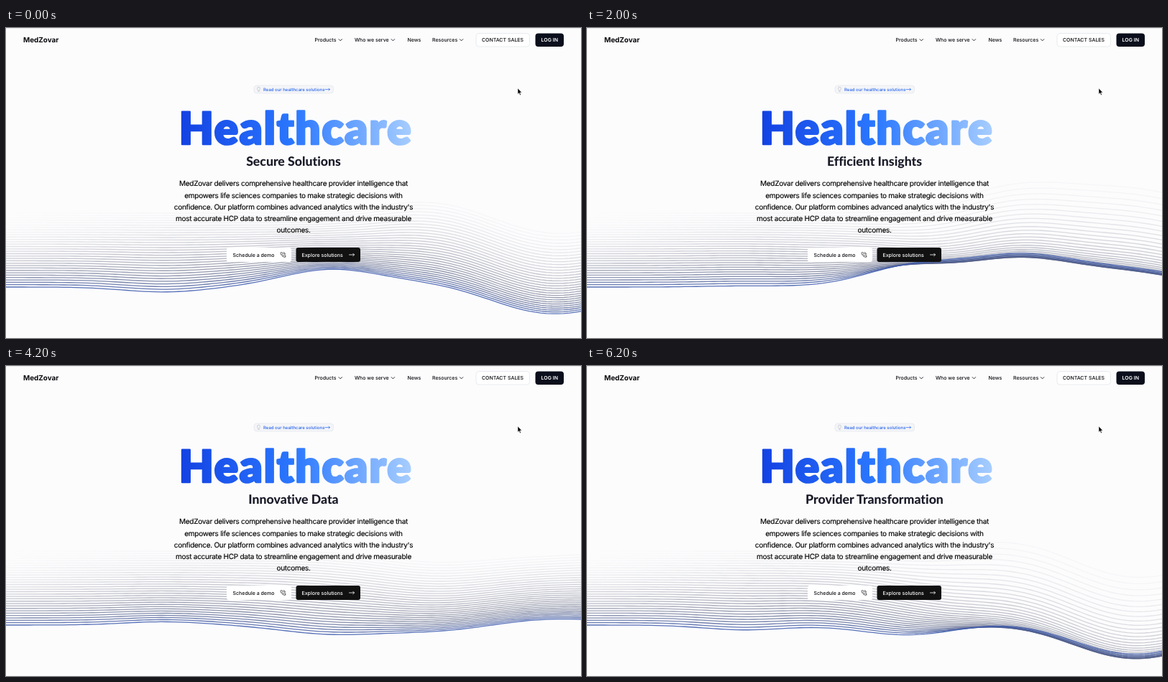
These frames come from a looping animation (800 by 432 pixels, 6300 ms). An HTML page with a canvas:

```html
<!DOCTYPE html>
<html lang="en">
<head>
<meta charset="utf-8">
<title>Healthcare</title>
<style>
  html, body { margin: 0; width: 100%; height: 100%; overflow: hidden; background: #fcfcfd; }
  canvas, svg { position: absolute; left: 0; top: 0; width: 800px; height: 432px; }
  text { font: 500 7px Inter, sans-serif; fill: #0b0b0f; text-rendering: geometricPrecision; }
  .brand { font-weight: 700; font-size: 9.9px; }
  .login { font-weight: 600; fill: #fff; }
  .badge { font-size: 6px; fill: #2563eb; }
  .hero { font: 900 62px Lato, sans-serif; letter-spacing: 1.8px; fill: url(#blues);
    stroke: url(#blues); stroke-width: 2.6; stroke-linejoin: round; }
  .titles text { font: 800 17.7px Lato, sans-serif; font-variant-ligatures: none; fill: #1a1b28; }
  .copy text { font-weight: 400; font-size: 10px; letter-spacing: -.26px; fill: #000; stroke: #000; stroke-width: .15; }
  .mid { text-anchor: middle; }
  .icon { fill: none; stroke: #18181b; stroke-linecap: round; stroke-linejoin: round; }
</style>
</head>
<body>
<canvas id="waves" width="800" height="432"></canvas>
<svg viewBox="0 0 800 432">
  <defs>
    <linearGradient id="blues" gradientUnits="userSpaceOnUse" x1="241" x2="563" y1="0" y2="0">
      <stop stop-color="#1341e2"/>
      <stop offset=".5" stop-color="#2b78ff"/>
      <stop offset="1" stop-color="#a6cdff"/>
    </linearGradient>
  </defs>

  <rect width="800" height="1" fill="#ececee"/>
  <text class="brand" x="24" y="20">MedZovar</text>
  <text x="429.5" y="19">Products</text>
  <text x="485" y="19">Who we serve</text>
  <text x="558.5" y="19">News</text>
  <text x="593" y="19">Resources</text>
  <path class="icon" stroke-width=".9" d="M463 15.6l2.2 2.2 2.2-2.2M536.2 15.6l2.2 2.2 2.2-2.2M631.4 15.6l2.2 2.2 2.2-2.2"/>
  <rect x="654" y="7.5" width="74.5" height="18.5" rx="4" fill="#fff" stroke="#e4e6ea" stroke-width=".8"/>
  <text class="mid" x="691" y="19">CONTACT SALES</text>
  <rect x="736.5" y="7.5" width="39.5" height="18.5" rx="4" fill="#0b0f1c"/>
  <text class="login mid" x="756.3" y="19">LOG IN</text>

  <rect x="345" y="80" width="110.5" height="11" rx="4" fill="#f4f5f8" stroke="#e2e5ea" stroke-width=".7"/>
  <path class="icon" style="stroke:#b5b8c0" stroke-width=".6" d="M350.8 87.2c0-1-1.3-1.5-1.3-2.9a2 2 0 0 1 4 0c0 1.4-1.3 1.9-1.3 2.9zM350.9 88.6h1.2"/>
  <text class="badge" x="358" y="87.8">Read our healthcare solutions</text>
  <path class="icon" style="stroke:#2563eb" stroke-width=".7" d="M444 85.6h6.5m-1.5-1.5l1.5 1.5-1.5 1.5"/>

  <text class="hero mid" x="403" y="162.3">Healthcare</text>
  <g class="titles mid" id="titles"></g>
  <g class="copy mid" id="copy"></g>

  <rect x="307" y="306" width="90" height="20" rx="3" fill="#fff"/>
  <text x="315.5" y="318.6">Schedule a demo</text>
  <path class="icon" stroke-width="2" transform="translate(381.3 312) scale(.34)" d="M22 16.92v3a2 2 0 0 1-2.18 2 19.79 19.79 0 0 1-8.63-3.07 19.5 19.5 0 0 1-6-6 19.79 19.79 0 0 1-3.07-8.67A2 2 0 0 1 4.11 2h3a2 2 0 0 1 2 1.72 12.84 12.84 0 0 0 .7 2.81 2 2 0 0 1-.45 2.11L8.09 9.91a16 16 0 0 0 6 6l1.27-1.27a2 2 0 0 1 2.11-.45 12.84 12.84 0 0 0 2.81.7A2 2 0 0 1 22 16.92zM14.05 2a9 9 0 0 1 8 7.94M14.05 6A5 5 0 0 1 18 10"/>
  <rect x="403.5" y="306" width="89.5" height="20" rx="3" fill="#111"/>
  <text x="411.5" y="318.6" style="fill:#fff">Explore solutions</text>
  <path class="icon" style="stroke:#fff" stroke-width=".8" d="M477.5 316h7m-1.7-1.7l1.7 1.7-1.7 1.7"/>

  <path d="M712 84v8.2l1.8-1.7 1.3 3 1.3-.6-1.3-2.9h2.5z" fill="#000" stroke="#fff" stroke-width=".5"/>
</svg>
<script>
const LOOP = 6300, STEP = 100, LINES = 32;
const ctx = document.getElementById('waves').getContext('2d');

function addText(parent, content, y) {
  const el = document.createElementNS('http://www.w3.org/2000/svg', 'text');
  el.setAttribute('x', 400);
  el.setAttribute('y', y);
  el.textContent = content;
  document.getElementById(parent).append(el);
  return el;
}

const titles = ['Secure Solutions', 'Efficient Insights', 'Innovative Data', 'Provider Transformation']
  .map(title => addText('titles', title, 192.3));
['MedZovar delivers comprehensive healthcare provider intelligence that',
 'empowers life sciences companies to make strategic decisions with',
 'confidence. Our platform combines advanced analytics with the industry\'s',
 'most accurate HCP data to streamline engagement and drive measurable',
 'outcomes.'].forEach((line, i) => addText('copy', line, 220.4 + i * 16.25));

// Bell-shaped swells, each bobbing around its mean; depth confines one to the lower lines.
const swells = [
  { x: 220, width: 80, mean: 0, height: 7, speed: 1, peak: .2, depth: 2 },
  { x: 450, width: 95, mean: -6, height: 26, speed: .75, peak: 5.3, depth: 2 },
  { x: 600, width: 110, mean: -13, height: 29, speed: 1, peak: 4.9, depth: 0 },
  { x: 760, width: 120, mean: 3, height: 38, speed: .95, peak: 6.2, depth: 0 },
];

// s runs from 0 at the top line to 1 at the bottom one, t is in seconds.
function waveY(x, s, t) {
  const sag = (25 + 18 * Math.cos(1.57 * (t - 2.2))) / (1 + Math.exp((470 - x) / 50));
  let y = 258 + 103 * s + sag * 4 * s * (1 - s);
  for (const { x: centre, width, mean, height, speed, peak, depth } of swells) {
    const bob = mean + height * Math.cos(speed * (t + .4 * (1 - s) - peak));
    y += s ** depth * Math.exp(-(((x - centre) / width) ** 2)) * bob;
  }
  return y;
}

function lineColour(s) {
  const blue = s ** 7, alpha = .04 + .82 * s ** 1.35;
  const rgb = `${92 - 32 * blue},${96 - 6 * blue},${118 + 54 * blue}`;
  const fade = ctx.createLinearGradient(0, 0, 250, 0);
  fade.addColorStop(0, `rgba(${rgb},${alpha * s})`);
  fade.addColorStop(1, `rgba(${rgb},${alpha})`);
  return fade;
}

function drawWaves(t) {
  ctx.clearRect(0, 0, 800, 432);
  ctx.lineWidth = 1.3;
  for (let i = 0; i < LINES; i++) {
    const s = i / (LINES - 1);
    ctx.strokeStyle = lineColour(s);
    ctx.beginPath();
    for (let x = 0; x <= 800; x += 8) ctx.lineTo(x, waveY(x, s, t));
    ctx.stroke();
  }
}

// Spring with stiffness 50, damping 10, mass 1.
function spring(ms) {
  const w = Math.max(ms, 0) / 200;
  return 1 - Math.exp(-w) * (Math.cos(w) + Math.sin(w));
}

function drawTitles(t) {
  const swap = n => spring(t - 693 - n * 2026);
  titles.forEach((el, i) => {
    const enter = i ? swap(i - 1) : 1;
    const leave = i < titles.length - 1 ? swap(i) : 0;
    el.setAttribute('transform', `translate(0 ${75 * (1 - enter - leave)})`);
    el.setAttribute('opacity', Math.max(0, Math.min(1, enter - leave)));
  });
}

function frame() {
  const t = Math.floor(performance.now() % LOOP / STEP) * STEP;
  drawWaves(t / 1000);
  drawTitles(t);
  requestAnimationFrame(frame);
}
frame();
</script>
</body>
</html>
```
